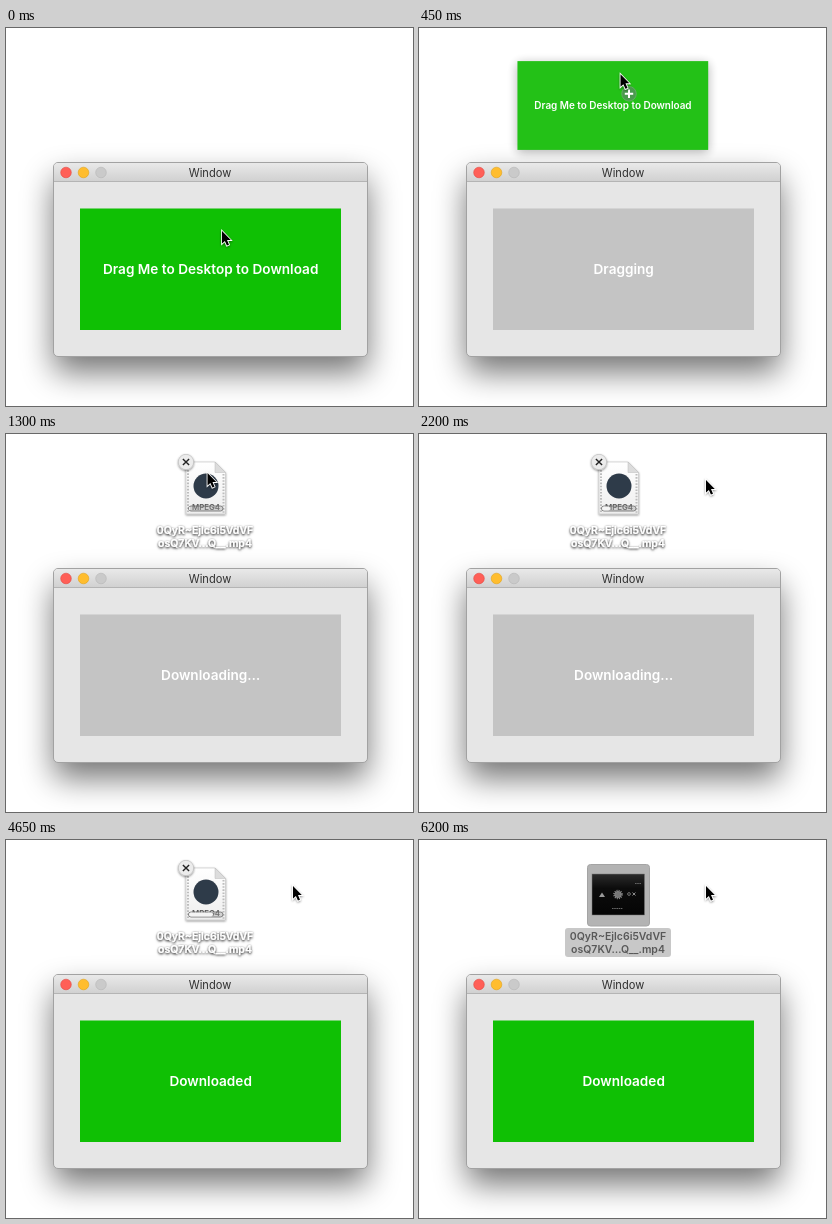
Recreate the animation shown at these times as an HTML page. Size 407 by 378 pixels, loop 6400 ms.

```html
<!DOCTYPE html>
<html lang="en">
<head>
<meta charset="utf-8">
<title>Drag to download</title>
<style>
  html, body { margin: 0; width: 100%; height: 100%; overflow: hidden; background: #fff; }
  svg { display: block; width: 100vw; height: 100vh; }
  text { font-family: Inter, "Open Sans", sans-serif; text-anchor: middle; }
  .caption { font-size: 13.6px; font-weight: 600; fill: #fff; }
  .label { font-size: 10.5px; font-weight: 600; }
</style>
</head>
<body>
<svg viewBox="0 0 407 378" xmlns="http://www.w3.org/2000/svg">
  <defs>
    <linearGradient id="bar" x2="0" y2="1">
      <stop stop-color="#e9e9e9"/><stop offset="1" stop-color="#d1d1d1"/>
    </linearGradient>
    <linearGradient id="page" x2="0" y2="1">
      <stop stop-color="#fff"/><stop offset="1" stop-color="#eee"/>
    </linearGradient>
    <linearGradient id="screen" x2="0" y2="1">
      <stop stop-color="#2b2b2b"/><stop offset=".35" stop-color="#0c0c0c"/><stop offset="1" stop-color="#050505"/>
    </linearGradient>
    <filter id="deep" x="-30%" y="-40%" width="160%" height="180%"><feGaussianBlur stdDeviation="16"/></filter>
    <filter id="lift" x="-20%" y="-30%" width="140%" height="160%"><feGaussianBlur stdDeviation="7"/></filter>
    <filter id="small" x="-30%" y="-30%" width="160%" height="160%">
      <feDropShadow dx="0" dy="1" stdDeviation="1" flood-opacity=".45"/>
    </filter>
    <filter id="glow" x="-20%" y="-40%" width="140%" height="180%">
      <feDropShadow dx="0" dy="1" stdDeviation="1.3" flood-opacity=".75"/>
      <feDropShadow dx="0" dy=".5" stdDeviation="1" flood-opacity=".4"/>
    </filter>
  </defs>

  <rect x="48" y="151" width="313" height="193" rx="5" opacity=".55" filter="url(#deep)"/>
  <rect x="47.5" y="134.5" width="314" height="194" rx="4.5" fill="#e6e6e6" stroke="#a2a2a2"/>
  <path d="M48 153V139q0-4 4-4H357q4 0 4 4V153Z" fill="url(#bar)"/>
  <path d="M48 153.5H361" stroke="#b4b4b4"/>
  <g stroke-width=".6">
    <circle cx="60" cy="144.5" r="5.3" fill="#ff5f57" stroke="#e2463f"/>
    <circle cx="77.5" cy="144.5" r="5.3" fill="#ffbd2e" stroke="#e1a116"/>
    <circle cx="95" cy="144.5" r="5.3" fill="#cacaca" stroke="#b6b6b6"/>
  </g>
  <text x="204" y="148.8" font-size="11.1" fill="#303030">Window</text>

  <rect id="zone" x="74" y="180.5" width="261" height="121.5"/>
  <text id="status" class="caption" x="204.7" y="246"></text>

  <g id="file">
    <g id="selection">
      <rect x="168.5" y="24.5" width="62" height="61.5" rx="3" fill="#b3b3b3" stroke="#a4a4a4"/>
      <rect x="146" y="88" width="106" height="29" rx="3" fill="#c8c8c8"/>
    </g>
    <g id="document" filter="url(#small)">
      <path d="M180 28H209L219.5 38.5V80H180Z" fill="url(#page)" stroke="#c2c2c2" stroke-width=".6"/>
      <path d="M182 30V79M217.5 40V79" stroke="#bdbdbd" stroke-width="2" stroke-dasharray="1.6 1.5"/>
      <path d="M209 28V38.5H219.5Z" fill="#dcdcdc" stroke="#bbb" stroke-width=".5"/>
      <circle cx="200" cy="52" r="12.5" fill="#2e3a48"/>
      <text x="200" y="76.3" font-size="7.8" font-weight="600" fill="#5a5a5a">MPEG4</text>
    </g>
    <g id="progress">
      <rect x="182.5" y="72" width="34.5" height="5" rx="2.5" fill="#999" fill-opacity=".35" stroke="#666" stroke-width=".8"/>
      <rect id="done" x="183" y="72.5" height="4" rx="2" fill="#f4f4f4"/>
    </g>
    <g id="thumb">
      <rect x="173" y="34" width="52.5" height="41" fill="url(#screen)" stroke="#777" stroke-width=".5"/>
      <path d="M180 57L183 52.5L186 57Z" fill="#999"/>
      <circle cx="199" cy="54.5" r="3.6" fill="#777" stroke="#8a8a8a" stroke-width="2.4" stroke-dasharray=".9 1"/>
      <circle cx="210" cy="54" r="1.4" fill="none" stroke="#888" stroke-width=".8"/>
      <path d="M213.5 52.5l3 3m0-3l-3 3" stroke="#999" stroke-width=".9"/>
      <path d="M216 43.5h6M193 68.5h11" stroke="#666" stroke-dasharray="1.6 .6"/>
    </g>
    <g id="plainLabel" class="label" fill="#fff" filter="url(#glow)">
      <text x="199" y="99.7">0QyR~Ejlc6i5VdVF</text><text x="199" y="113">osQ7KV…Q__.mp4</text>
    </g>
    <g id="pickedLabel" class="label" fill="#585858">
      <text x="199" y="99.7">0QyR~Ejlc6i5VdVF</text><text x="199" y="113">osQ7KV…Q__.mp4</text>
    </g>
    <g id="cancel" filter="url(#small)">
      <circle cx="180" cy="28" r="7.7" fill="#ececec" stroke="#b5b5b5" stroke-width=".6"/>
      <path d="M176.9 24.9l6.2 6.2m0-6.2l-6.2 6.2" stroke="#222" stroke-width="1.4"/>
    </g>
  </g>

  <g id="ghost">
    <rect y="3" width="261" height="121.5" opacity=".32" filter="url(#lift)"/>
    <rect width="261" height="121.5" fill="#18be0b"/>
    <text class="caption" x="130.7" y="65.5">Drag Me to Desktop to Download</text>
  </g>

  <g id="cursor">
    <g id="badge">
      <circle cx="8.5" cy="19.5" r="7.3" fill="#4a9a4e" stroke="#6fae72" stroke-width=".7"/>
      <path d="M8.5 15.3v8.4M4.3 19.5h8.4" stroke="#fff" stroke-width="2"/>
    </g>
    <path d="M0 0V12.6L2.9 9.9L4.9 14.6L7 13.7L5 9.1H8.8Z" stroke="#fff" stroke-width="1.6" paint-order="stroke" filter="url(#small)"/>
  </g>
</svg>
<script>
const LOOP = 6400, STEP = 50, GREEN = '#0fc004', GRAY = '#c4c4c4';
const el = {};
document.querySelectorAll('[id]').forEach(node => el[node.id] = node);

const clamp = v => Math.min(1, Math.max(0, v));
const span = (t, from, to) => clamp((t - from) / (to - from));
const mix = (a, b, k) => a + (b - a) * k;
const easeOut = (u, power) => 1 - (1 - u) ** power;
const smooth = u => u * u * (3 - 2 * u);
const fade = (node, opacity) => node.setAttribute('opacity', opacity);

function along(t, stops) {
  const i = stops.findIndex(([time]) => t < time);
  if (i === 0) return stops[0][1];
  if (i < 0) return stops[stops.length - 1][1];
  const [t0, v0] = stops[i - 1], [t1, v1] = stops[i];
  return mix(v0, v1, span(t, t0, t1));
}

function cursorAt(t) {
  const lift = easeOut(span(t, 0, 570), 2);
  const glide = smooth(span(t, 1450, 2150));
  return {
    x: mix(mix(216, 201.5, clamp(lift * 1.3)), 287, glide),
    y: mix(mix(203, 39, lift), 46, glide)
  };
}

function statusAt(t) {
  if (t < 50) return 'Drag Me to Desktop to Download';
  if (t < 700) return 'Dragging';
  return t < 4650 ? 'Downloading…' : 'Downloaded';
}

function draw(t) {
  const { x, y } = cursorAt(t);
  el.cursor.setAttribute('transform', `translate(${x} ${y})`);
  fade(el.badge, t >= 100 && t < 700 ? 1 : 0);

  el.zone.setAttribute('fill', t >= 50 && t < 4650 ? GRAY : GREEN);
  el.status.textContent = statusAt(t);

  // The ghost stays gripped at the same relative point while it shrinks.
  const scale = 1 - 0.336 * easeOut(span(t, 0, 650), 1.37);
  el.ghost.setAttribute('transform',
    `translate(${x - 141 * scale} ${y - 18 * scale}) scale(${scale})`);
  fade(el.ghost, t < 50 ? 0 : 0.95 * (1 - span(t, 650, 800)));

  const picked = span(t, 4650, 4800);
  const preview = span(t, 5800, 6200);
  fade(el.file, t < 950 ? 0 : 1);
  fade(el.selection, picked);
  fade(el.pickedLabel, picked);
  fade(el.plainLabel, 1 - picked);
  fade(el.cancel, 1 - picked);
  fade(el.progress, t < 1300 ? 0 : 1 - picked);
  fade(el.document, 1 - preview);
  fade(el.thumb, preview);

  const edge = along(t, [[1450, 184], [2750, 196.5], [2850, 198], [3400, 198], [3850, 206.5], [4000, 207]]);
  el.done.setAttribute('width', edge - 183);
}

const start = performance.now();
function tick() {
  const t = (performance.now() - start) % LOOP;
  draw(Math.floor(t / STEP) * STEP);
  requestAnimationFrame(tick);
}
tick();
</script>
</body>
</html>
```
